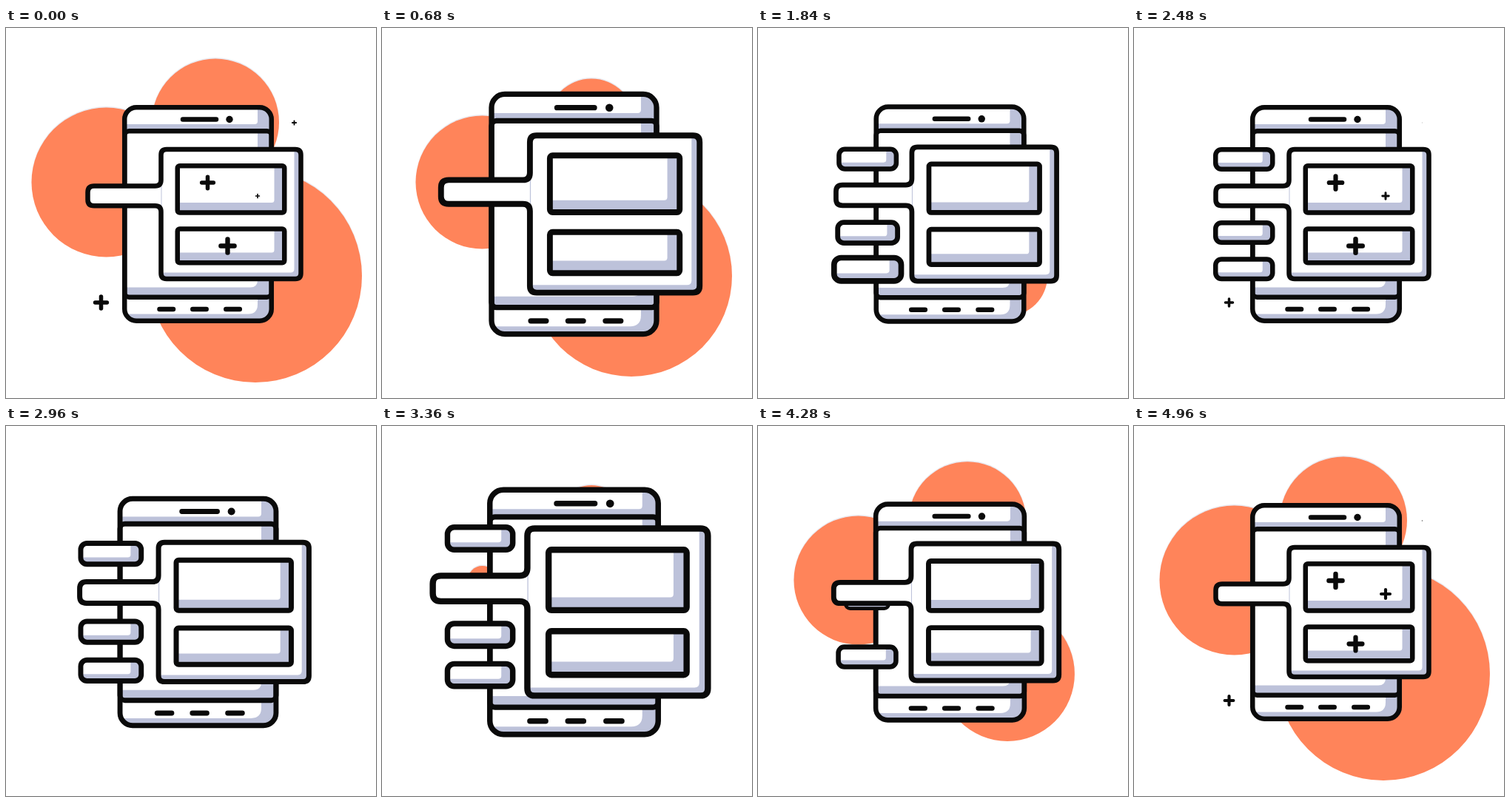
An HTML page for the animation above (5000 ms loop, 500 by 500 pixels).

```html
<!DOCTYPE html>
<html lang="en">
<head>
<meta charset="utf-8">
<title>Mobile interface</title>
<style>
  html, body { margin: 0; width: 100%; height: 100%; overflow: hidden; background: #fff; }
  svg { display: block; width: 100vw; height: 100vh; }
  .line { fill: none; stroke: #0a0a0a; stroke-width: 6.5; stroke-linecap: round; stroke-linejoin: round; }
  .shade { fill: #bdc2da; }
  .white { fill: #fff; }
  .disc { fill: #ff845a; }
  .rim { fill: #e9eaf2; }
</style>
</head>
<body>
<svg viewBox="0 0 500 500">
  <g id="discs"></g>
  <g id="phone"></g>
  <g id="panel"></g>
  <g id="stars"></g>
</svg>
<script>
const LOOP = 5000, HALF = 2500;
const $ = id => document.getElementById(id);

// Shape helpers; boxes are given by their left, top, right and bottom edges
const rect = (cls, l, t, r, b, rx) =>
  `<rect class="${cls}" x="${l}" y="${t}" width="${r - l}" height="${b - t}" rx="${rx}"/>`;
const path = (cls, d) => `<path class="${cls}" d="${d}"/>`;
const light = (l, t, r, b, c) =>
  path('white', `M${l} ${t}H${r}V${b - c}Q${r} ${b} ${r - c} ${b}H${l}Z`);
const shadedBox = (l, t, r, b, rx, lightRight, lightBottom) =>
  rect('shade', l, t, r, b, rx) + light(l + 1, t + 1, lightRight, lightBottom, 3.5) +
  rect('line', l, t, r, b, rx);

const discs = [
  { x: 135.5, y: 208.5, r: 101, out: 1695, back: 1813, power: 2.14 },
  { x: 283, y: 127.5, r: 86, out: 1098, back: 2405, power: 2.1 },
  { x: 337, y: 335, r: 144, out: 2235, back: 1084, power: 2.43 }
];
const bars = [
  { y: 177.5, enter: 1014, leave: 2920 },
  { y: 276.5, enter: 1334, leave: 3240 },
  { y: 325.75, enter: 1494, leave: 3400 }
];
const TAB_Y = 226.9;
const stars = [
  { x: 272.5, y: 209, size: 12.3, peak: -40, width: 340, lag: 0 },
  { x: 340, y: 227, size: 10.4, peak: -80, width: 260, lag: 0 },
  { x: 299.5, y: 294.5, size: 12.5, peak: -15, width: 400, lag: 0 },
  { x: 128.5, y: 371, size: 10.7, peak: 5, width: 260, lag: 30 },
  { x: 389.5, y: 128, size: 7, peak: 65, width: 260, lag: 30 }
];

$('discs').innerHTML = discs.map(d =>
  `<circle class="rim" cx="${d.x}" cy="${d.y - 1.5}"/><circle class="disc" cx="${d.x}" cy="${d.y}"/>`).join('');

$('phone').innerHTML =
  rect('shade', 160.25, 107.25, 358.75, 395.75, 16) +
  light(163, 110, 340, 130, 4) +
  light(163, 141, 340, 350.5, 10) +
  light(163, 366, 340, 386.5, 13) +
  rect('line', 160.25, 139.25, 358.75, 363.75, 6) +
  rect('line', 160.25, 107.25, 358.75, 395.75, 16) +
  path('line', 'M239 123.5H284M207.5 380H226M252.3 380H270.7M297.3 380H315.8') +
  '<circle cx="302" cy="123.5" r="4.7" fill="#0a0a0a"/>' +
  bars.map(() => `<g class="bar">${shadedBox(-38.5, -13.3, 38.5, 13.3, 8, 25, 4.5)}</g>`).join('');

const outline = 'M217 164H391Q398.5 164 398.5 171.5V331.5Q398.5 339 391 339H217' +
  'Q209.5 339 209.5 331.5V248.25Q209.5 240.25 201.5 240.25H119Q110.5 240.25 110.5 232V222' +
  'Q110.5 213.5 119 213.5H201.5Q209.5 213.5 209.5 205.5V171.5Q209.5 164 217 164Z';
$('panel').innerHTML =
  path('white', outline) +
  rect('shade', 209.5, 164, 398.5, 339, 7) +
  light(210.5, 165, 389.5, 330.5, 5) +
  path('line', outline) +
  shadedBox(231.75, 186.25, 376.25, 249.5, 3, 362.5, 236) +
  shadedBox(231.75, 271.5, 376.25, 317.25, 3, 362.5, 303.5);

$('stars').innerHTML = stars.map(() => path('line', 'M-9.25 0H9.25M0 -9.25V9.25')).join('');

const rimEls = document.querySelectorAll('.rim');
const discEls = document.querySelectorAll('.disc');
const barEls = document.querySelectorAll('.bar');
const starEls = $('stars').children;

// Motion helpers
const clamp = x => Math.min(1, Math.max(0, x));
const ease = x => x < .5 ? .5 * (2 * x) ** 2.3 : 1 - .5 * (2 - 2 * x) ** 2.3;
const backIn = (x, s) => x * x * ((s + 1) * x - s);
const swell = (t, delay, amount) => {
  const p = (t - delay + HALF) % HALF / 1000;
  return 1 + amount * ease(p < 1 ? p : Math.max(0, 2 - p));
};
const scaleAbout = (el, x, y, k) =>
  el.setAttribute('transform', `translate(${x} ${y}) scale(${k}) translate(${-x} ${-y})`);
const place = (el, x, y, k) => {
  el.setAttribute('transform', `translate(${x} ${y}) scale(${k})`);
  el.style.display = k > .01 ? '' : 'none';
};

function draw(t) {
  discs.forEach((d, i) => {
    const gone = t < HALF ? (t / d.out) ** 2.43 : ((LOOP - t) / d.back) ** d.power;
    const r = d.r * clamp(1 - gone);
    rimEls[i].setAttribute('r', r);
    discEls[i].setAttribute('r', r);
  });

  scaleAbout($('phone'), 259.5, 251.5, swell(t, 0, .15));
  scaleAbout($('panel'), 254.5, 251.75, swell(t, 100, .32));

  bars.forEach((b, i) => {
    const pop = 1 - backIn(1 - clamp((t - b.enter) / 600), 2.4);
    const exit = clamp((t - b.leave) / 1077);
    const y = b.y + (TAB_Y - b.y) * backIn(exit, 3.3);
    const k = exit < 1 ? pop * (1 - .33 * clamp((exit - .85) / .15)) : 0;
    place(barEls[i], 148.75, y, k);
  });

  stars.forEach((s, i) => {
    const second = t >= HALF / 2 && t < HALF * 1.5;
    const centre = s.peak + (second ? HALF + s.lag : t < HALF ? 0 : LOOP);
    const d = Math.abs(t - centre) / s.width;
    place(starEls[i], s.x, s.y, d < .5 ? s.size / 12.5 * Math.cos(Math.PI * d) ** 2 : 0);
  });
}

function tick(now) {
  draw(now % LOOP);
  requestAnimationFrame(tick);
}
requestAnimationFrame(tick);
</script>
</body>
</html>
```
